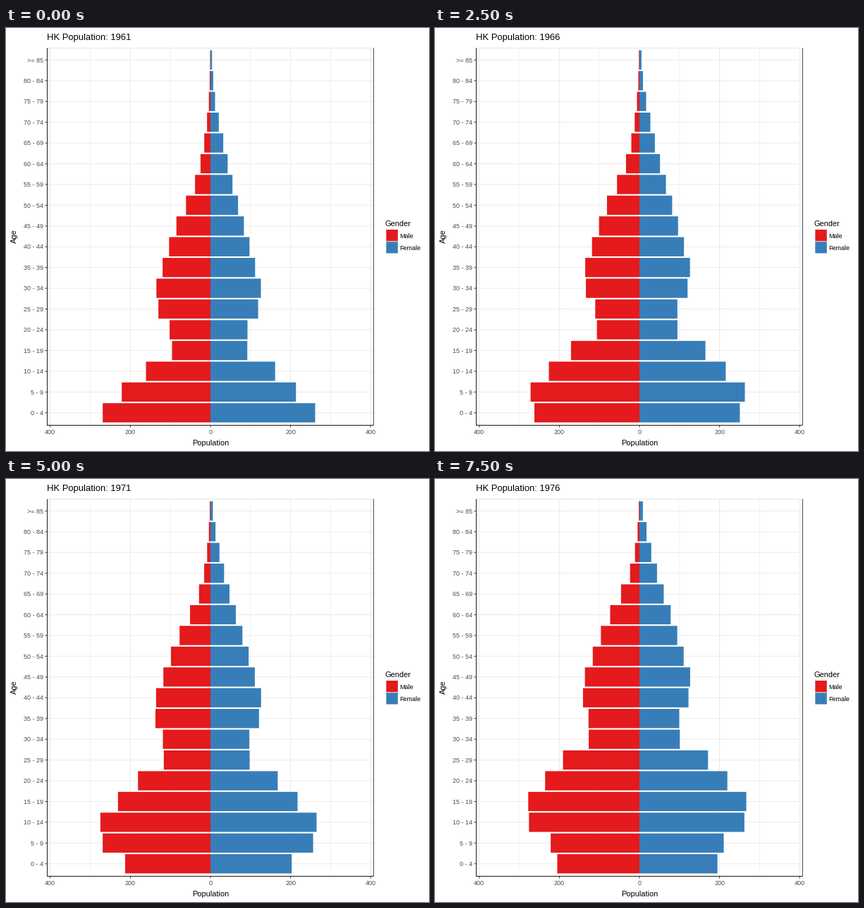
Animation of 600 by 600 pixels, one loop 8000 ms. Source, as a matplotlib script:

```python
import numpy as np
import matplotlib.pyplot as plt
from matplotlib.animation import FuncAnimation
from matplotlib.patches import Rectangle

plt.rcParams["font.family"] = "Liberation Sans"

RED, BLUE = "#E41A1C", "#377EB8"
ZERO, UNIT = 290, 0.568               # x of zero, pixels per thousand people
BASE, STEP, BAR = 545.8, 29.44, 27.3  # y of the youngest band, spacing, bar height
LEFT, RIGHT, TOP, BOTTOM = 58.5, 521.5, 28.5, 563.5

START, YEARS = 1961, 16
AGES = [f"{a} - {a + 4}" for a in range(0, 85, 5)] + [">= 85"]

# Cohort sizes in thousands at a few birth years.
BORN = np.array([1876, 1886, 1896, 1906, 1916, 1926, 1931, 1936, 1941,
                 1946, 1951, 1956, 1961, 1964, 1969, 1973, 1976])
BOYS = np.array([0.8, 4, 15.5, 38.5, 85, 119.5, 135, 130, 102,
                 96, 161, 221.5, 269, 274, 215, 182, 174])
GIRLS = np.array([4, 11.5, 32, 55, 83.5, 111.5, 126, 119, 92.5,
                  92, 161.5, 213.5, 261.5, 263.5, 206, 174.5, 166.5])


def smooth(x, xs, ys):
    """Cubic Hermite curve through the key points."""
    slope = np.gradient(ys, xs)
    i = np.clip(np.searchsorted(xs, x, side="right") - 1, 0, len(xs) - 2)
    span = xs[i + 1] - xs[i]
    t = (x - xs[i]) / span
    ease = t * t * (3 - 2 * t)
    return (ys[i] * (1 - ease) + ys[i + 1] * ease
            + span * t * (1 - t) * ((1 - t) * slope[i] - t * slope[i + 1]))


def people(k, sizes, limit, mid, spread, influx):
    """Age every cohort by k years: the old die off, young adults move in."""
    born = START + k - 5 * np.arange(len(AGES))
    after15 = (limit / (1 + np.exp((mid - born) / spread))
               + influx * np.exp(-((born - 1945) / 7.5) ** 2)
               + 0.01 * np.maximum(born - START, 0))
    return smooth(born, BORN, sizes) * (1 + (after15 - 1) * k / 15)


fig = plt.figure(figsize=(6, 6), dpi=100, facecolor="white")
ax = fig.add_axes([0, 0, 1, 1])
ax.set(xlim=(0, 600), ylim=(600, 0))
ax.axis("off")


def line(x0, y0, x1, y1, color, z=1):
    ax.plot([x0, x1], [y0, y1], color=color, lw=0.72, zorder=z,
            solid_capstyle="butt", snap=False)


def label(x, y, text, px, color="black", **kw):
    return ax.text(x, y, text, fontsize=px * 0.72, color=color, **kw)


def box(x, y, w, h, color):
    return ax.add_patch(Rectangle((x, y), w, h, fc=color, lw=0, zorder=3, snap=False))


for v in range(-400, 401, 100):
    x = ZERO + v * UNIT
    major = v % 200 == 0
    line(x, TOP, x, BOTTOM, "#EBEBEB" if major else "#F4F4F4")
    if major:
        line(x, BOTTOM, x, BOTTOM + 3, "#333333")
        label(x, 576, str(abs(v)), 9, "#4D4D4D", ha="center")

rows = BASE - STEP * np.arange(len(AGES))
for y, age in zip(rows, AGES):
    line(LEFT, y, RIGHT, y, "#EBEBEB")
    line(LEFT - 3, y, LEFT, y, "#333333")
    label(53.3, y + 3.2, age, 9, "#4D4D4D", ha="right")

line(LEFT, TOP, RIGHT, TOP, "#E5E5E5", 4)
line(RIGHT, TOP, RIGHT, BOTTOM, "#4D4D4D", 4)
line(LEFT, TOP, LEFT, BOTTOM + 0.5, "#1A1A1A", 5)
line(LEFT, BOTTOM, RIGHT, BOTTOM, "#1A1A1A", 5)

label(290, 592, "Population", 11, ha="center")
label(12, 295, "Age", 11, ha="center", va="center", rotation=90)
label(538, 281, "Gender", 11)
for y, color, name in [(286, RED, "Male"), (303.2, BLUE, "Female")]:
    box(539.3, y, 16.5, 16.3, color)
    label(558, y + 12, name, 9)

title = label(58, 17, "", 13)
left_bars = [box(ZERO, y - BAR / 2, 0, BAR, RED) for y in rows]
right_bars = [box(ZERO, y - BAR / 2, 0, BAR, BLUE) for y in rows]


def draw(k):
    title.set_text(f"HK Population: {START + k}")
    males = people(k, BOYS, limit=1.03, mid=1903, spread=8, influx=0.3)
    females = people(k, GIRLS, limit=1.02, mid=1894.5, spread=9, influx=0.08)
    for bar, v in zip(left_bars, males):
        bar.set_x(ZERO - v * UNIT)
        bar.set_width(v * UNIT)
    for bar, v in zip(right_bars, females):
        bar.set_width(v * UNIT)
    return [title, *left_bars, *right_bars]


anim = FuncAnimation(fig, draw, frames=YEARS, interval=500,
                     repeat=True, repeat_delay=0, blit=False)
plt.show()
```
